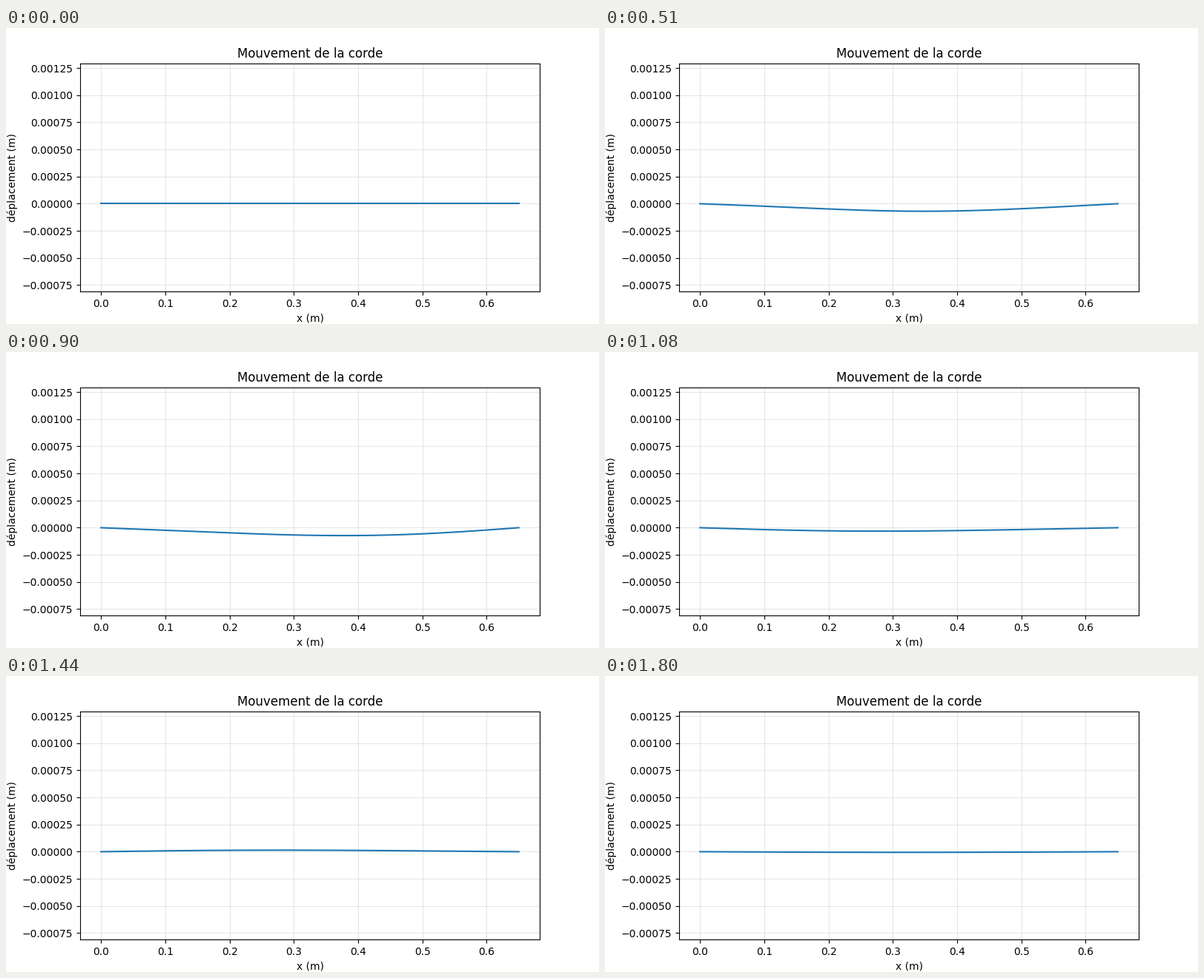
These frames come from a looping animation (800x400 px, 1830 ms). A matplotlib script:

```python
import numpy as np
import matplotlib.pyplot as plt
from matplotlib.animation import FuncAnimation

LENGTH = 0.65
FRAMES = 61
x = np.linspace(0, LENGTH, 200)

# mode number, amplitude (m), decay per step, phase and turn per step (degrees)
MODES = [
    (1, 3.68e-4, 0.0495, 132.0, 75.5),
    (2, 1.77e-4, 0.095, 340.0, 159.5),
    (3, -1.0e-4, 0.2, 36.0, 226.5),
]


def pulse():
    """Bump raised by the strike, pinned at both ends."""
    bump = np.exp(-((x - 0.11) / 0.05) ** 2)
    bump *= 1 - np.exp(-x / 0.02)
    return 1.29e-3 * bump / bump.max()


def shape(n):
    if n == 0:
        return np.zeros_like(x)
    if n == 1:
        return pulse()
    y = np.zeros_like(x)
    for m, amp, decay, phase, turn in MODES:
        swing = amp * np.exp(-decay * n) * np.sin(np.radians(phase + turn * n))
        y += swing * np.sin(m * np.pi * x / LENGTH)
    return y


fig, ax = plt.subplots(figsize=(8, 4), dpi=100)
line, = ax.plot(x, shape(0))
ax.set_ylim(-8.08e-4, 1.291e-3)
ax.set_title("Mouvement de la corde")
ax.set_xlabel("x (m)")
ax.set_ylabel("déplacement (m)")
ax.grid(alpha=0.3)


def update(n):
    line.set_ydata(shape(n))
    return line,


anim = FuncAnimation(fig, update, frames=FRAMES, interval=30, repeat=True)
plt.show()
```
